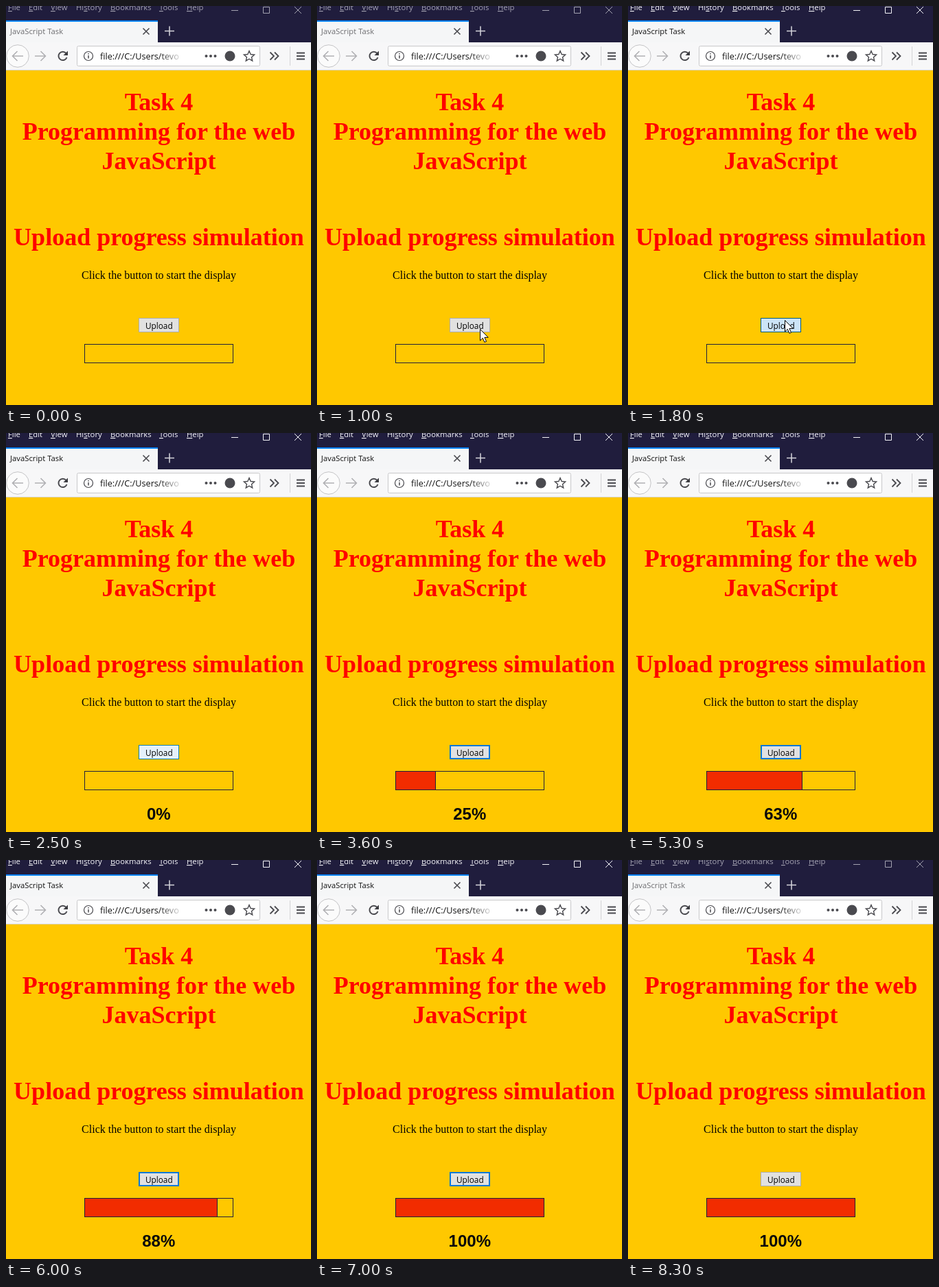
Write an HTML page that moves like this. It is 444 px wide and 582 px high and loops after 8400 ms.

```html
<!DOCTYPE html>
<html lang="en">
<head>
<meta charset="utf-8">
<title>Upload progress</title>
<style>
  html, body { margin: 0; width: 100%; height: 100%; overflow: hidden; background: #ffc800; }
  svg { display: block; width: 444px; height: 582px; }
  text { white-space: pre; }
  .ui { font-family: "Open Sans", "Noto Sans", sans-serif; font-size: 11.3px; }
  .serif { font-family: "Liberation Serif", "Times New Roman", serif; text-anchor: middle; }
  .head { font-size: 36px; font-weight: bold; fill: #f00; }
  .line { fill: none; stroke: #4a4a4f; stroke-width: 1.6; }
  #percent { font: bold 24px "Liberation Sans", Arial, sans-serif; text-anchor: middle; fill: #0a0a0a; }
</style>
</head>
<body>
<svg viewBox="0 0 444 582">
  <defs>
    <linearGradient id="fade">
      <stop offset="0" stop-color="#fff" stop-opacity="0"/>
      <stop offset="1" stop-color="#fff"/>
    </linearGradient>
  </defs>
  <rect width="444" height="582" fill="#ffc800"/>

  <!-- title bar and tab strip -->
  <rect width="444" height="53" fill="#201d3d"/>
  <g id="menu" class="ui"></g>
  <g id="controls" fill="none">
    <path d="M328 6.5h10M374.5 1.5h9v9h-9zM420 1l10 10M430 1l-10 10"/>
  </g>
  <rect y="21" width="221" height="32" fill="#f5f6f7"/>
  <rect y="21" width="221" height="2" fill="#0a84ff"/>
  <text id="tab" class="ui" x="6" y="41">JavaScript Task</text>
  <path class="line" d="M199.500 32.500l9 9M208.500 32.500l-9 9"/>
  <path d="M231 36.500h14M238 29.500v14" stroke="#d5d5dc" stroke-width="1.500"/>

  <!-- toolbar -->
  <rect y="53" width="444" height="41" fill="#f7f7f8"/>
  <rect y="93" width="444" height="1" fill="#d8d4c4"/>
  <circle cx="17" cy="73" r="16.300" fill="#fbfbfb" stroke="#c4c4c6"/>
  <g class="line">
    <path d="M25 73H10M16.500 66l-7 7l7 7M42 73h15M50.500 66l7 7l-7 7" stroke="#b1b1b4"/>
    <path d="M87.500 69a6.200 6.200 0 1 0 1 6" stroke-width="2"/>
  </g>
  <path d="M90 65.500v6.500h-6.500z" fill="#3c3c40"/>
  <rect x="103.500" y="58.500" width="266" height="29" rx="2" fill="#fff" stroke="#c8c8ca"/>
  <circle class="line" cx="120" cy="73" r="6.500" style="stroke-width:1.200"/>
  <path d="M120 72v4.500M120 69v1.600" stroke="#4a4a4f" stroke-width="1.500"/>
  <text class="ui" x="137" y="78" style="font-size:12.700px" fill="#111">file:///C:/Users/tevo</text>
  <rect x="222" y="62" width="36" height="22" fill="url(#fade)"/>
  <g fill="#4a4a4f">
    <circle cx="291.500" cy="73" r="2"/><circle cx="298" cy="73" r="2"/><circle cx="304.500" cy="73" r="2"/>
    <circle cx="326" cy="73" r="7.500"/>
  </g>
  <path id="star" class="line" style="stroke-width:1.400"/>
  <path class="line" d="M384.500 67.500l5.500 5.500l-5.500 5.500M391 67.500l5.500 5.500l-5.500 5.500" style="stroke-width:1.800"/>
  <path d="M413.500 59v28" stroke="#d3d3d5"/>
  <path class="line" d="M423 68.500h12M423 73h12M423 77.500h12" style="stroke-width:1.800"/>

  <!-- page -->
  <g class="serif head">
    <text x="222.500" y="152">Task 4</text>
    <text x="222.500" y="195">Programming for the web</text>
    <text x="222.500" y="238">JavaScript</text>
    <text x="222.500" y="349">Upload progress simulation</text>
  </g>
  <text class="serif" x="222.500" y="398" font-size="16">Click the button to start the display</text>
  <rect id="button"/>
  <text class="ui" x="222.800" y="471" text-anchor="middle" style="font-size:11.800px">Upload</text>
  <rect id="fill" x="114.500" y="493.500" height="27" fill="#f22c00" stroke="#20203c"/>
  <rect x="114.500" y="493.500" width="216" height="27" fill="none" stroke="#20203c"/>
  <text id="percent" x="222.300" y="564"></text>
  <path id="cursor" d="M.5 .5v16.500l3.800-3.600l2.600 6l2.600-1.100l-2.600-5.900h5.300z" fill="#fff" stroke="#000"/>
</svg>
<script>
const LOOP = 8400, STEP = 100;
const START = 2500, TICK = 500, GAIN = 12.5;
const ACTIVE = [1700, 8300];
const $ = id => document.getElementById(id);
const set = (el, attrs) => { for (const k in attrs) el.setAttribute(k, attrs[k]); };

// label, x, index of the underlined letter
const MENU = [["File", 3, 0], ["Edit", 33, 0], ["View", 65, 0], ["History", 102, 2],
  ["Bookmarks", 152, 0], ["Tools", 223, 0], ["Help", 263, 0]];
$("menu").innerHTML = MENU.map(([word, x, i]) =>
  `<text x="${x}" y="6">${word.slice(0, i)}<tspan text-decoration="underline">${word[i]}</tspan>${word.slice(i + 1)}</text>`
).join("");

const star = Array.from({ length: 10 }, (_, i) => {
  const a = (i / 5 - 0.5) * Math.PI, r = i % 2 ? 3.7 : 8;
  return `${(354 + r * Math.cos(a)).toFixed(2)} ${(73.5 + r * Math.sin(a)).toFixed(2)}`;
});
set($("star"), { d: `M${star.join("L")}z` });

// start time, fill, border, border width
const BUTTON = [
  [0, "#e1e1e1", "#adadad", 1],
  [1300, "#e5f1fb", "#0078d7", 1],
  [1700, "#cce4f7", "#005a80", 1],
  [2300, "#e5f1fb", "#0a80b4", 1],
  [2800, "#e1e1e1", "#0078d7", 2],
  [8300, "#e1e1e1", "#adadad", 1]
];

function drawButton(t) {
  const [, fill, stroke, w] = BUTTON.filter(s => s[0] <= t).pop();
  set($("button"), { x: 193 + w / 2, y: 455 + w / 2, width: 59 - w, height: 21 - w,
    fill, stroke, "stroke-width": w });
}

function drawCursor(t) {
  const p = Math.min(1, Math.max(0, (t - 500) / 800));
  const left = (1 - p) ** 2;
  set($("cursor"), {
    visibility: t >= 500 && t < 2300 ? "visible" : "hidden",
    transform: `translate(${Math.round(228 + 62 * left)} ${Math.round(458 + 92 * left)})`
  });
}

function drawProgress(t) {
  const ticks = Math.floor((t - START) / TICK);
  const value = Math.min(100, ticks * GAIN);
  $("percent").textContent = ticks < 0 ? "" : Math.round(value) + "%";
  set($("fill"), {
    visibility: ticks > 0 ? "visible" : "hidden",
    width: Math.min(216, Math.round(4 + 2.16 * Math.max(0, value)))
  });
}

function draw(t) {
  const on = t >= ACTIVE[0] && t < ACTIVE[1];
  set($("menu"), { fill: on ? "#f4f4f8" : "#a3a2b0" });
  set($("controls"), { stroke: on ? "#f4f4f8" : "#a3a2b0" });
  set($("tab"), { fill: on ? "#111" : "#6d6d70" });
  drawButton(t);
  drawCursor(t);
  drawProgress(t);
}

let origin;
function frame(now) {
  origin ??= now;
  draw(Math.floor((now - origin + 20) / STEP) * STEP % LOOP);
  requestAnimationFrame(frame);
}
draw(0);
requestAnimationFrame(frame);
</script>
</body>
</html>
```
